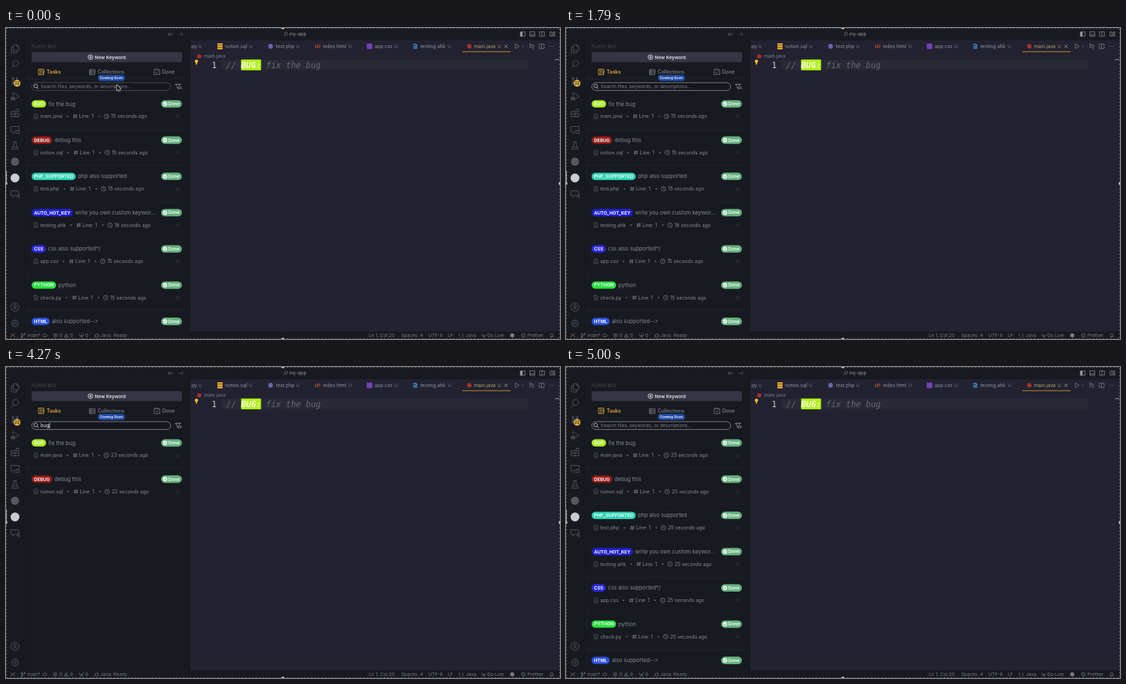
Animation, 800 px wide and 450 px high, one loop 5030 ms. Source, as an HTML page with a canvas:

```html
<!DOCTYPE html>
<html lang="en">
<head>
<meta charset="utf-8">
<title>Task keywords</title>
<style>
html, body { margin: 0; width: 100%; height: 100%; overflow: hidden; background: #181a21; }
canvas { display: block; width: 800px; height: 450px; }
</style>
</head>
<body>
<canvas id="stage"></canvas>
<script>
const LOOP = 5030;
const canvas = document.getElementById('stage');
const ctx = canvas.getContext('2d');
const ratio = window.devicePixelRatio || 1;
canvas.width = 800 * ratio;
canvas.height = 450 * ratio;

const SANS = 'Inter, sans-serif';
const MONO = '"DejaVu Sans Mono", monospace';
const GREY = '#7d8088', DIM = '#555861', FAINT = '#24262e';
const PANEL = '#181a21', EDITOR = '#222230';

// ---- drawing helpers ----
function rect(x, y, w, h, color) {
  ctx.fillStyle = color;
  ctx.fillRect(x, y, w, h);
}

function pill(x, y, w, h, r, fill, stroke, lineWidth = 0.8) {
  ctx.beginPath();
  ctx.roundRect(x, y, w, h, r);
  if (fill) { ctx.fillStyle = fill; ctx.fill(); }
  if (stroke) { ctx.strokeStyle = stroke; ctx.lineWidth = lineWidth; ctx.stroke(); }
}

function dot(x, y, r, color) {
  ctx.beginPath();
  ctx.arc(x, y, r, 0, Math.PI * 2);
  ctx.fillStyle = color;
  ctx.fill();
}

// Draws text centred vertically on y and returns its right edge.
// Splitting after hyphens keeps "-->" from turning into an arrow ligature.
function text(str, x, y, size, color, weight = 400, family = SANS) {
  ctx.font = `${weight} ${size}px ${family}`;
  ctx.fillStyle = color;
  for (const part of str.split(/(?<=-)/)) {
    ctx.fillText(part, x, y + size * 0.36);
    x += ctx.measureText(part).width;
  }
  return x;
}

function icon(path, x, y, color = DIM, lineWidth = 0.8, scale = 1) {
  ctx.save();
  ctx.translate(x, y);
  ctx.scale(scale, scale);
  ctx.strokeStyle = color;
  ctx.lineWidth = lineWidth / scale;
  ctx.stroke(new Path2D(path));
  ctx.restore();
}

const ring = r => `M${r} 0A${r} ${r} 0 1 1 ${-r} 0A${r} ${r} 0 1 1 ${r} 0`;
const ICONS = {
  left: 'M3.5 0H-3.5M-.8-2.7L-3.5 0L-.8 2.7',
  right: 'M-3.5 0H3.5M.8-2.7L3.5 0L.8 2.7',
  search: 'M3.2-1.2A2.7 2.7 0 1 1-2.2-1.2A2.7 2.7 0 1 1 3.2-1.2M-1.4.8L-3.7 3.4',
  find: 'M2-.8A2.6 2.6 0 1 1-3.2-.8A2.6 2.6 0 1 1 2-.8M1.3 1.1L3.6 3.4',
  cross: 'M-2.6-2.6L2.6 2.6M2.6-2.6L-2.6 2.6',
  page: 'M-2.5-3.5H1L2.8-1.7V3.5H-2.5ZM1-3.5V-1.7H2.8M-1.2.2H1.4M-1.2 1.8H1.4',
  hash: 'M-1-3L-1.8 3M1.8-3L1 3M-3-1.2H3M-3.2 1.2H2.8',
  clock: ring(3.3) + 'M0-2V.2L1.4 1',
  plus: ring(3.4) + 'M-1.9 0H1.9M0-1.9V1.9',
  list: 'M-4-3.6H4V3.6H-4ZM-4-1.2H4M-4 1.2H4M-1.8-3.6V3.6',
  check: 'M-4-3.6H4V3.6H-4ZM-1.8 0L-.4 1.5L2.2-1.6M-1.5-4.4H1.5',
  notes: 'M-4-4H3.5V4H-4ZM-2.4-2H2M-2.4 0H2M-2.4 2H.2M1 2.6L5-1.4',
  filter: 'M-4.4-3.4H3.2L.4 0V3.6L-1.6 2.2V0ZM2 1H4.6M2 2.8H4.6',
  files: 'M-2.4-6H2.6L5.4-3.2V3H-2.4ZM2.6-6V-3.2H5.4M-2.4-3H-5.2V6H2.6V3',
  branch: 'M-3-3V3M3-2.6C3 1-3-.2-3 3M-4.2-4.2H-1.8V-2H-4.2ZM1.8-4.2H4.2V-2H1.8ZM-4.2 3H-1.8V5H-4.2Z',
  debug: 'M-3-1V-6L6 0L-.2 4M-5.6 1H-.6V5H-5.6ZM-3.1 1V5M-6 3H-.2',
  blocks: 'M-5.5-2.2H0V5.5H-5.5ZM-5.5 1.6H5.5V5.5H0M1.6-5.5H5.6V-1.4H1.6Z',
  remote: 'M-6-4.5H6V1M-6-4.5V3H0M-3 5.4H0M1.4 1.4H6V5.4H1.4Z',
  flask: 'M-2.4-5.5H2.4M-1.5-5.5V-1.5L-5 5.3H5L1.5-1.5V-5.5M-3.2 2H3.2',
  chat: 'M-6-4.5H5V2H0L-3 4.6V2H-6ZM2 4H5.4L6.2 5.6V0',
  person: ring(6) + 'M2-1.5A2 2 0 1 1-2-1.5A2 2 0 1 1 2-1.5M-4 4.2C-3 1 3 1 4 4.2',
  gear: ring(4.4) + ring(1.8) + 'M0-6V-4.4M0 6V4.4M-6 0H-4.4M6 0H4.4M-4.3-4.3L-3-3M4.3 4.3L3 3M-4.3 4.3L-3 3M4.3-4.3L3-3',
  play: 'M-2.4-3.4L3.2 0L-2.4 3.4Z',
  down: 'M-1.8-.8L0 1L1.8-.8',
  diff: 'M-2.5-2.6V1.8H1M2.5 2.6V-1.8H-1M-3.5-3.6H-1.5M1.5 3.6H3.5M.2-3.2L-1.2-1.8L.2-.4',
  split: 'M-3.5-3.2H3.5V3.2H-3.5ZM0-3.2V3.2',
  frame: 'M-3.5-3.2H3.5V3.2H-3.5Z',
  grid: 'M-3.5-3H-.7V3H-3.5ZM1-3H3.5V-.7H1ZM1 .9H3.5V3H1Z',
  code: 'M-1.7-2L-4 0L-1.7 2M1.7-2L4 0L1.7 2M.7-2.8L-.7 2.8',
  link: 'M-3-2.5L-.5 0L-3 2.5M3-3L.5-.5L3 2',
  cloud: 'M-2.8 1.8H2.6A1.6 1.6 0 0 0 2.2-1A2.4 2.4 0 0 0-2.3-1A1.5 1.5 0 0 0-2.8 1.8',
  error: ring(2.9) + 'M-1.2-1.2L1.2 1.2M1.2-1.2L-1.2 1.2',
  warning: 'M0-2.8L3.1 2.6H-3.1ZM0-1V.9',
  antenna: 'M0-1V3M-1.3 3L0-1L1.3 3M-2.8-2.8C-3.6-1-3.6-.4-2.8 1M2.8-2.8C3.6-1 3.6-.4 2.8 1',
  tag: 'M-3-1H-1L1-3L2-2L1-.8H3V2.6H-3Z',
  ban: ring(2.9) + 'M-2-2L2 2',
  bell: 'M-3 1.8L-2 .6V-1A2 2 0 0 1 2-1V.6L3 1.8ZM-.8 3H.8'
};

// ---- static window ----
function drawTitleBar() {
  icon(ICONS.left, 238, 9, GREY, 0.7);
  icon(ICONS.right, 252, 9, DIM, 0.7);
  icon(ICONS.search, 404, 9, GREY, 0.7, 0.8);
  text('my-app', 409, 9, 6.8, '#9698a0');
  for (const [name, x] of [['frame', 746], ['frame', 760], ['split', 774], ['grid', 789]])
    icon(ICONS[name], x, 8.8, '#92949c', 0.7);
  rect(743, 6, 3, 6, '#92949c');
  rect(757, 9.5, 6, 0.8, '#92949c');
}

function drawActivityBar() {
  const items = { files: 30, search: 53, branch: 76, debug: 99, blocks: 123, remote: 147,
                  flask: 170, chat: 240, person: 404, gear: 427.5 };
  for (const [name, y] of Object.entries(items))
    icon(ICONS[name], 13, y, DIM, 0.9, name === 'search' ? 1.55 : 1);
  dot(13, 193.5, 6, DIM);
  dot(13, 217, 6.4, '#c9cacd');
  rect(0, 207, 1.2, 20, '#c4c5ca');
  dot(16, 80, 4.9, '#dfae3d');
  text('22', 12.6, 80, 5.6, '#26221a', 600);
}

function drawTabs() {
  rect(659, 33.8, 70, 0.9, '#d59c36');
  const tabs = [['.py', 266, 278], ['notion.sql', 316, 351], ['test.php', 389.8, 419],
                ['index.html', 457.5, 494.5], ['app.css', 532.3, 561], ['testing.ahk', 598.5, 638],
                ['main.java', 676, 710]];
  for (const [name, x, mark] of tabs) {
    const active = name === 'main.java';
    text(name, x, 26.5, 6.95, active ? '#b9a777' : '#9496a0');
    text('U', mark, 26.5, 6.5, active ? '#a79870' : '#777983');
  }
  for (const y of [23.3, 26.5, 29.7]) pill(305, y - 1.4, 8, 2.7, 1.2, '#e4a52d');
  dot(382, 26.5, 3.4, '#6767a8');
  icon(ICONS.code, 450, 26.5, '#d8692e', 1);
  rect(521, 22.5, 8, 8, '#6d42b8');
  icon(ICONS.page, 591, 26.5, '#4d8fc9', 1.1, 0.85);
  dot(669, 26.5, 3.2, '#a92f32');
  icon(ICONS.cross, 722, 26.5, '#b4b5bc', 0.8, 0.85);
  icon(ICONS.play, 738, 26.5, GREY);
  icon(ICONS.down, 746.5, 26.5, GREY, 0.6);
  icon(ICONS.diff, 759, 26.5, GREY);
  icon(ICONS.split, 773.5, 26.5, GREY);
  for (const x of [784.5, 787, 789.5]) dot(x, 26.5, 0.6, GREY);
}

function drawEditor() {
  rect(266, 18, 534, 421, EDITOR);
  drawTabs();
  dot(279, 41, 3, '#a92f32');
  text('main.java', 286, 41, 6.9, '#81838d');
  rect(311, 46, 443, 14.5, '#2a2a37');
  dot(275, 48.2, 2.4, '#f0bd35');
  rect(273.9, 50.5, 2.2, 2.2, '#f0bd35');
  const code = (str, x, color, style = '') => text(str, x, 53.6, 11.95, color, style + ' 400', MONO);
  const comment = '#686975';
  code('1', 297, '#d0d0d6');
  const tag = code('// ', 318, comment, 'italic');
  rect(339.5, 45.6, 28.8, 15.6, '#b2f318');
  const rest = text('BUG:', tag, 53.6, 11.95, '#f8fbee', 'italic 700', MONO);
  code(' fix the bug', rest, comment, 'italic');
  rect(793, 45.3, 6, 1, '#a0a1a8');
}

function drawStatusBar() {
  rect(0, 439, 800, 11, '#181921');
  const y = 444.8, color = '#797b84';
  const label = (str, x) => text(str, x, y, 6.75, color);
  const mark = (name, x, scale = 0.9) => icon(ICONS[name], x, y, color, 0.7, scale);
  icon(ICONS.link, 10, y, '#a89a5d', 0.8);
  mark('branch', 25, 0.65); label('main*', 31);
  mark('cloud', 56);
  mark('error', 71); label('0', 77);
  mark('warning', 87); label('0', 92.5);
  mark('antenna', 109); label('0', 114.5);
  mark('tag', 131); label('Java: Ready', 136);
  label('Ln 1, Col 20', 524);
  label('Spaces: 4', 570.5);
  label('UTF-8', 610);
  label('LF', 638);
  label('{ }', 653.5);
  label('Java', 664);
  mark('antenna', 690); label('Go Live', 695);
  dot(731, y, 3, color);
  mark('ban', 747); label('Prettier', 753);
  mark('bell', 788);
}

function drawPanelHeader() {
  text('PLINTH BOX', 37, 26.5, 5.95, '#4b4e57');
  pill(37, 35, 217, 14.5, 2.2, '#343644');
  icon(ICONS.plus, 122, 42.2, '#e7e8eb', 0.9);
  text('New Keyword', 128.3, 42.3, 6.7, '#e4e5e9', 600);
  icon(ICONS.notes, 51, 63.5, '#dba53c', 0.9);
  text('Tasks', 58.8, 63.8, 7.2, '#dfab47', 600);
  icon(ICONS.list, 124.5, 63.8, GREY, 0.8);
  text('Collections', 132.5, 63.8, 7.2, GREY, 500);
  icon(ICONS.check, 218, 63.8, GREY, 0.8);
  text('Done', 225.5, 63.8, 7.3, GREY, 500);
  rect(27, 73.6, 238, 0.6, FAINT);
  pill(132.5, 67.7, 39.5, 9, 4.5, '#1f4aa3');
  text('Coming Soon', 135.2, 72.2, 5.15, '#e8edf8', 700);
}

// ---- task list ----
const TASKS = [
  ['BUG', '#a8ee20', 'fix the bug', 'main.java'],
  ['DEBUG', '#9b1b1b', 'debug this', 'notion.sql'],
  ['PHP_SUPPORTED', '#2bd5b4', 'php also supported', 'test.php'],
  ['AUTO_HOT_KEY', '#2020cf', 'write you own custom keywor...', 'testing.ahk'],
  ['CSS', '#2a2ae8', 'css also supported*/', 'app.css'],
  ['PYTHON', '#25df3b', 'python', 'check.py'],
  ['HTML', '#2a50e2', 'also supported-->', 'index.html']
];

function drawTask([tag, color, title, file], y, seconds, compact) {
  ctx.font = `700 6.6px ${SANS}`;
  const tagWidth = ctx.measureText(tag).width + 6.8;
  pill(37, y - 5.3, tagWidth, 10.6, 5.3, color);
  text(tag, 40.4, y, 6.6, '#f3f5f5', 700);
  text(title, 37 + tagWidth + 3.2, y, 7.75, '#878a92');

  const doneX = compact ? 231 : 224;
  pill(doneX, y - 5.4, 254 - doneX, 10.8, 5.4, '#65b07e');
  if (!compact) {
    dot(229.7, y, 3.2, '#f2f7f3');
    icon('M-1.5 0L-.4 1.2L1.6-1.1', 229.7, y, '#4d9867', 0.9);
  }
  text('Done', compact ? 234.5 : 234.3, y, 6.5, '#f2f7f3', 700);

  const metaY = y + (compact ? 16 : 18), metaColor = '#898c94';
  const meta = (str, x) => text(str, x, metaY, 7.1, metaColor);
  if (!compact) icon(ICONS.page, 43, metaY, DIM, 0.7);
  let x = meta(file, compact ? 41 : 49.5);
  dot(x + 7.5, metaY, 0.9, metaColor);
  if (!compact) icon(ICONS.hash, x + 18.7, metaY, metaColor, 0.7);
  x = meta('Line: 1', x + (compact ? 17.8 : 24.2));
  dot(x + 8.2, metaY, 0.9, metaColor);
  if (!compact) icon(ICONS.clock, x + 18.7, metaY, metaColor, 0.7);
  meta(`${seconds} seconds ago`, x + (compact ? 17 : 25.2));
  if (!compact) icon(ICONS.cross, 248, metaY, '#41444c', 0.7);
  rect(27, y + (compact ? 32 : 36), 238, 0.6, FAINT);
}

// ---- timeline ----
const between = (t, from, to) => t >= from && t < to;

function stateAt(t) {
  const typed = between(t, 1850, 4760)
    ? 'bug'.slice(0, t < 1960 ? 1 : t < 2080 ? 2 : t < 4450 ? 3 : t < 4640 ? 2 : 1)
    : '';
  return {
    typed,
    compact: between(t, 1850, 2290) || between(t, 4450, 4940),
    filtered: between(t, 1850, 4820),
    age: i => t >= 4450 ? 25 : t >= 1850 ? 23 - i : i === 3 ? 16 : 15,
    caret: typed && !between(t, 2730, 3240) && !between(t, 3700, 4150),
    focus: Math.min(1, Math.max(0, (t - 250) / 300)),
    pointer: t < 1600
  };
}

function drawSearch({ typed, caret, focus }) {
  const level = Math.round(88 + 64 * focus);
  pill(37.3, 79.1, 200.3, 11.3, 5.6, '#15171c', `rgb(${level},${level},${level + 5})`, 0.8);
  icon(ICONS.find, 43.5, 84.8, '#c2c4ca', 0.9);
  if (typed) {
    const end = text(typed, 50, 84.8, 6.9, '#f4f4f6');
    if (caret) rect(end, 81, 0.8, 7.8, '#f4f4f6');
  } else {
    text('Search files, keywords, or descriptions...', 50, 84.8, 6.85, '#7f828a');
  }
  icon(ICONS.filter, 249, 84.8, '#9b9da4', 0.9);
}

function drawPointer() {
  const arrow = new Path2D('M160 82.2V90.2L161.8 88.6L163 91.2L164.5 90.5L163.3 88H165.7Z');
  ctx.lineJoin = 'round';
  ctx.lineWidth = 1.2;
  ctx.strokeStyle = '#f2f2f2';
  ctx.stroke(arrow);
  ctx.fillStyle = '#111';
  ctx.fill(arrow);
  ctx.lineJoin = 'miter';
}

function drawSelection() {
  ctx.strokeStyle = '#6f7178';
  ctx.lineWidth = 1;
  ctx.setLineDash([2, 3]);
  ctx.strokeRect(0.5, 0.5, 799, 449);
  ctx.setLineDash([]);
  for (const [x, y] of [[400, 0], [400, 450], [0, 225], [800, 225]]) dot(x, y, 2, '#c2c3c7');
}

function draw(t) {
  const state = stateAt(t);
  ctx.setTransform(ratio, 0, 0, ratio, 0, 0);
  rect(0, 0, 800, 450, PANEL);
  drawTitleBar();
  drawActivityBar();
  drawPanelHeader();
  drawSearch(state);

  ctx.save();
  ctx.beginPath();
  ctx.rect(26, 92, 239, 347);
  ctx.clip();
  const pitch = state.compact ? 48.5 : 52.45;
  TASKS.slice(0, state.filtered ? 2 : TASKS.length).forEach((task, i) =>
    drawTask(task, 109.8 + i * pitch, state.age(i), state.compact));
  ctx.restore();

  rect(26, 18, 0.7, 421, '#13141a');
  rect(265, 18, 1, 421, '#13141a');
  drawEditor();
  drawStatusBar();
  if (state.pointer) drawPointer();
  drawSelection();
}

const start = performance.now();
function tick() {
  draw((performance.now() - start) % LOOP);
  requestAnimationFrame(tick);
}
tick();
</script>
</body>
</html>
```
